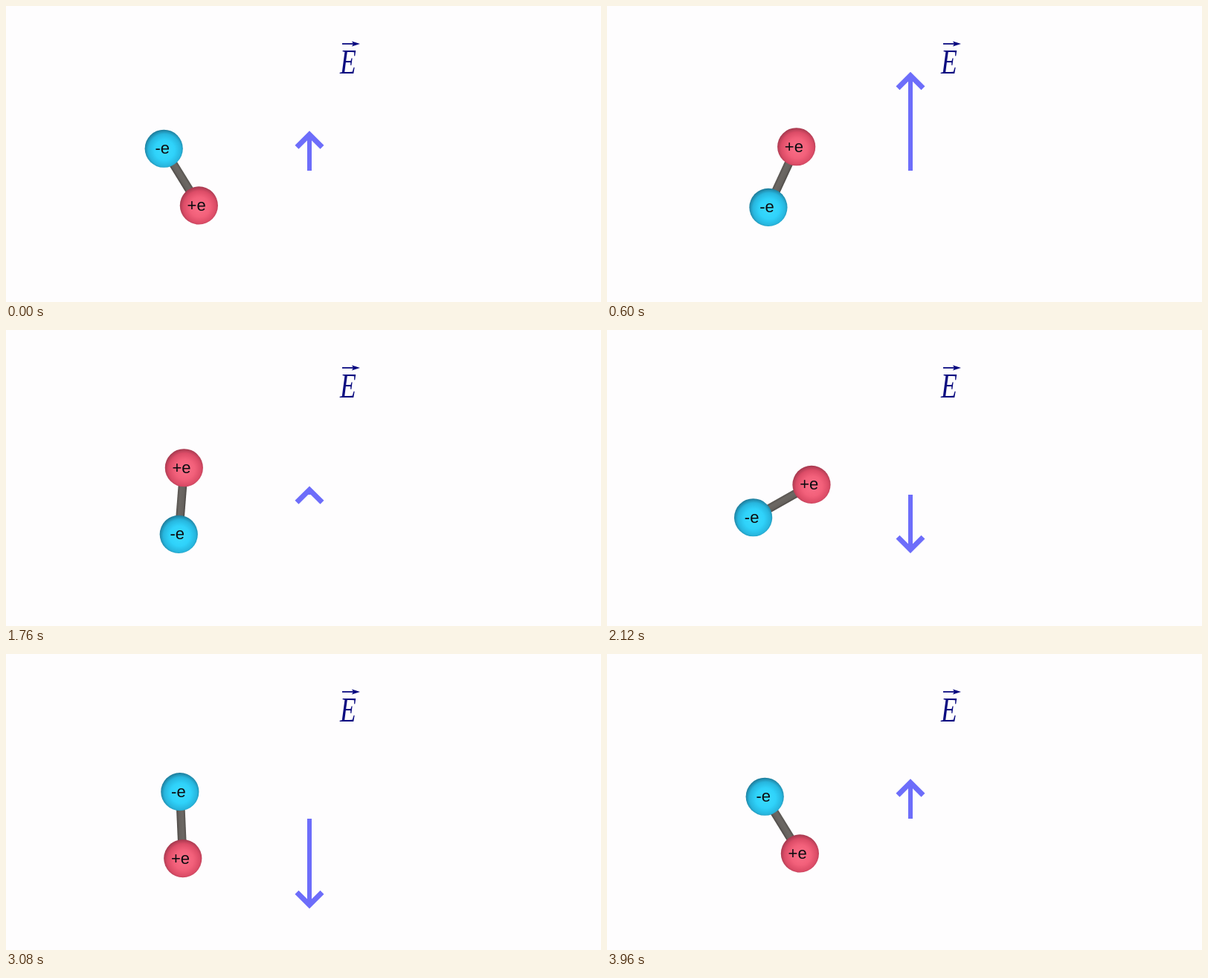
Animation of 800 by 399 pixels, one loop 4 s. Source, as an HTML page:

```html
<!DOCTYPE html>
<html lang="en">
<head>
<meta charset="utf-8">
<title>Dipole in an alternating field</title>
<style>
  html, body { margin: 0; width: 100%; height: 100%; overflow: hidden; background: #fefdfe; }
  svg { display: block; width: 100%; height: 100%; }
  .charge text { font: 22px "Liberation Sans", Arial, sans-serif; text-anchor: middle; fill: #0c0c10; }
  .symbol { font: italic 47px "Liberation Serif", "Times New Roman", serif; fill: #0b0b80; }
</style>
</head>
<body>
<svg viewBox="0 0 800 399">
  <defs>
    <radialGradient id="red" cx=".52" cy=".54" r=".53">
      <stop offset="0" stop-color="#fb7089"/>
      <stop offset=".5" stop-color="#f2607a"/>
      <stop offset=".8" stop-color="#dc4c67"/>
      <stop offset="1" stop-color="#a83a50"/>
    </radialGradient>
    <radialGradient id="blue" cx=".52" cy=".54" r=".53">
      <stop offset="0" stop-color="#3cdcff"/>
      <stop offset=".5" stop-color="#2fd2fa"/>
      <stop offset=".8" stop-color="#27b6de"/>
      <stop offset="1" stop-color="#1f7f9e"/>
    </radialGradient>
    <linearGradient id="metal">
      <stop offset="0" stop-color="#57534f"/>
      <stop offset=".3" stop-color="#6c6864"/>
      <stop offset=".75" stop-color="#66625e"/>
      <stop offset="1" stop-color="#4c4845"/>
    </linearGradient>
  </defs>

  <g transform="translate(449 91) scale(.76 1)"><text class="symbol">E</text></g>
  <path d="M452 51H470" stroke="#0b0b80" stroke-width="1.8"/>
  <path d="M465 47.5L476 51L465 54.5L467 51Z" fill="#0b0b80"/>

  <g fill="none" stroke="#6d6dfa">
    <path id="shaft" stroke-width="6"/>
    <path id="head" stroke-width="7"/>
  </g>

  <rect id="rod" x="-5.8" y="-42" width="11.6" height="84" fill="url(#metal)"/>
  <g id="minus" class="charge"><circle r="25.6" fill="url(#blue)"/><text x="-2" y="7">-e</text></g>
  <g id="plus" class="charge"><circle r="25.6" fill="url(#red)"/><text x="-3.3" y="7">+e</text></g>
</svg>
<script>
const LOOP = 4000, STEP = 40, PERIOD = LOOP - STEP, HALF = PERIOD / 2;
const FIELD = { x: 408, y: 222, size: 127, phase: 19.7 * Math.PI / 180 };
const DIPOLE = { x: 235.8, y: 230.6, arm: 45, start: 1680 };

// One half turn: time, angle in degrees, slope
const TURN = [
  [0, 2.4, 0], [80, 4.5, .065], [300, 31.6, .18], [800, 140, .172],
  [900, 155.2, .13], [1300, 176.8, .012], [1500, 177.6, 0], [HALF, 177.6, 0]
];

const get = id => document.getElementById(id);
const [shaft, head, rod, minus, plus] = ['shaft', 'head', 'rod', 'minus', 'plus'].map(get);

function hermite(keys, t) {
  const i = Math.max(1, keys.findIndex(k => k[0] >= t));
  const [t0, a, m0] = keys[i - 1], [t1, b, m1] = keys[i];
  const h = t1 - t0, u = (t - t0) / h, v = 1 - u;
  return v * v * ((1 + 2 * u) * a + u * h * m0) + u * u * ((1 + 2 * v) * b - v * h * m1);
}

function drawField(t) {
  const { x, y, size, phase } = FIELD;
  const value = size * Math.sin(2 * Math.PI * t / PERIOD + phase);
  const dir = value < 0 ? 1 : -1;
  const apex = y - value + dir * 6;
  const wing = apex - dir * 17;
  shaft.setAttribute('d', `M${x} ${y}V${apex}`);
  head.setAttribute('d', `M${x - 17} ${wing}L${x} ${apex}L${x + 17} ${wing}`);
}

function drawDipole(t) {
  const { x, y, arm, start } = DIPOLE;
  const since = (t - start + PERIOD) % PERIOD;
  const swing = hermite(TURN, since % HALF);
  const deg = since < HALF ? swing : 180 - swing;
  const dx = arm * Math.sin(deg * Math.PI / 180);
  const dy = -arm * Math.cos(deg * Math.PI / 180);
  rod.setAttribute('transform', `translate(${x} ${y}) rotate(${deg})`);
  plus.setAttribute('transform', `translate(${x + dx} ${y + dy})`);
  minus.setAttribute('transform', `translate(${x - dx} ${y - dy})`);
}

function draw(now) {
  const t = Math.floor(now % LOOP / STEP) * STEP;
  drawField(t);
  drawDipole(t);
}

let began;
function tick(now) {
  began ??= now;
  draw(now - began);
  requestAnimationFrame(tick);
}
draw(0);
requestAnimationFrame(tick);
</script>
</body>
</html>
```
